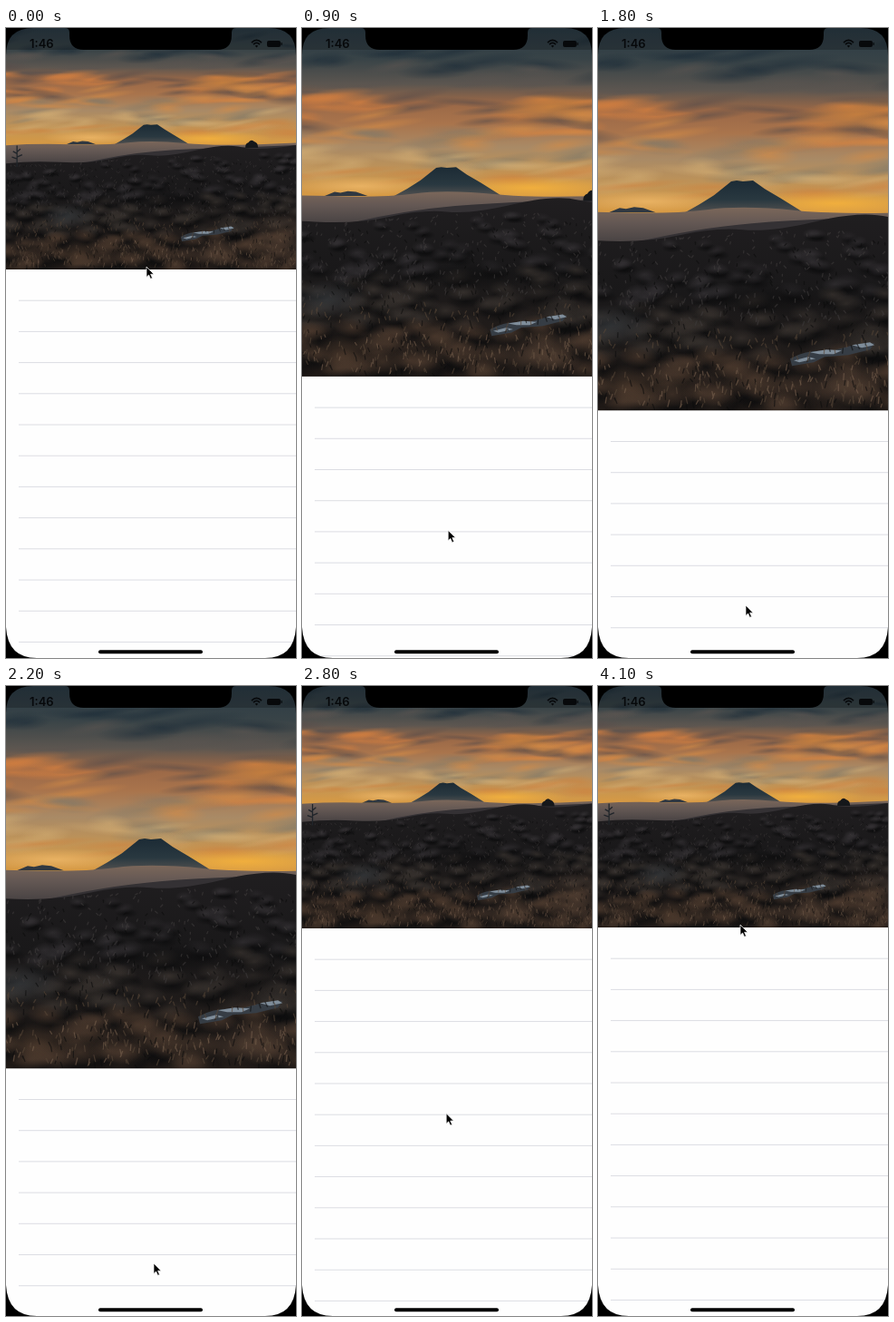
Recreate the animation shown at these times as an HTML page. Size 320 by 694 pixels, loop 4.2 s.

```html
<!DOCTYPE html>
<html lang="en">
<head>
<meta charset="utf-8">
<title>Stretchy header</title>
<style>
  html, body { margin: 0; width: 100%; height: 100%; overflow: hidden; background: #000; }
  svg { display: block; width: 320px; height: 694px; }
  text { font: 600 13px Inter, sans-serif; }
</style>
</head>
<body>
<svg viewBox="0 0 320 694">
  <defs>
    <linearGradient id="sky" x2="0" y2="1">
      <stop offset="0" stop-color="#2b3b45"/>
      <stop offset=".18" stop-color="#384347"/>
      <stop offset=".33" stop-color="#5c5650"/>
      <stop offset=".44" stop-color="#9a6847"/>
      <stop offset=".56" stop-color="#a9744c"/>
      <stop offset=".7" stop-color="#a98a66"/>
      <stop offset=".85" stop-color="#c29455"/>
      <stop offset="1" stop-color="#d99a41"/>
    </linearGradient>
    <linearGradient id="peak" x2="0" y2="1">
      <stop offset="0" stop-color="#1c2b35"/>
      <stop offset=".6" stop-color="#293840"/>
      <stop offset="1" stop-color="#51504f"/>
    </linearGradient>
    <linearGradient id="fog" x2="0" y2="1">
      <stop offset="0" stop-color="#7b675a"/>
      <stop offset=".35" stop-color="#645854"/>
      <stop offset="1" stop-color="#3d3a3c"/>
    </linearGradient>
    <linearGradient id="land" x2="0" y2="1">
      <stop offset="0" stop-color="#201e20"/>
      <stop offset=".4" stop-color="#191819"/>
      <stop offset=".75" stop-color="#211c1a"/>
      <stop offset="1" stop-color="#1e1815"/>
    </linearGradient>
  </defs>
  <g id="photo">
    <rect x="-100" width="520" height="206" fill="url(#sky)"/>
    <g id="clouds"></g>
    <path d="M12 203 L24 198 L31 199 L40 197 L50 198 L64 203Z" fill="#303841"/>
    <path d="M96 203 L112 194 L128 184 L147 169 L153 168 L160 169 L171 168 L184 177 L201 187 L222 200 L226 203Z" fill="url(#peak)"/>
    <path d="M-100 205 Q-40 201 20 203 T120 200 T220 201 T420 200 V245 H-100Z" fill="url(#fog)"/>
    <path d="M40 236 Q110 220 170 215 T300 209 L420 204 V250 H40Z" fill="#343134"/>
    <path d="M-100 237 Q-50 231 0 234 T90 228 T160 222 T240 213 T320 208 T420 203 V423 H-100Z" fill="url(#land)"/>
    <path d="M325 209 Q324 202 330 200 Q334 193 340 198 Q347 200 347 209Z" fill="#15171a"/>
    <path d="M-74 242 V205 M-74 219 l-7 -4 M-74 216 l6 -5 M-74 228 l-9 -3 M-74 225 l9 -4" stroke="#20252a" stroke-width="2" fill="none"/>
    <g id="bushes"></g>
    <path d="M212 364 Q232 353 256 356 L278 350 L305 347 L300 354 L276 360 L250 362 L238 368 L214 372Z" fill="#363d45"/>
    <path d="M234 357 l18 -3 l17 1 l-9 4 l-16 0Z M280 349 l20 -3 l5 3 l-14 3Z M216 366 l16 -4 l8 2 l-18 4Z" fill="#7f8d9a"/>
    <g id="grass" fill="none" stroke-linecap="round"></g>
  </g>
  <g id="table">
    <rect width="320" height="694" fill="#fefefe"/>
    <path id="rules" stroke="#dcdde3" fill="none"/>
  </g>
  <rect width="320" height="24" fill="#000" opacity=".22"/>
  <g fill="#07090b">
    <text x="26" y="22">1:46</text>
    <rect x="288" y="14" width="15" height="7" rx="2"/>
    <rect x="303.5" y="16" width="1.2" height="3" rx=".6"/>
    <path d="M274.6 17 l2 -2 M276.5 21.5 l-1.7 -1.8 a2.6 2.6 0 0 1 3.4 0Z"/>
    <path d="M273 18 Q276.5 14.5 280 18 M271 16 Q276.5 10.5 282 16" transform="translate(0 .2)" fill="none" stroke="#07090b" stroke-width="1.7"/>
  </g>
  <path d="M65 0 Q70 0 70 5 V8 Q70 24 86 24 H233 Q249 24 249 8 V5 Q249 0 254 0Z"/>
  <path fill-rule="evenodd" d="M0 0 H320 V694 H0Z M30 0 Q0 0 0 30 V660 Q2 694 34 694 H286 Q318 694 320 660 V30 Q320 0 290 0Z"/>
  <rect x="102" y="685.3" width="115" height="4" rx="2"/>
  <path id="cursor" d="M0 0 V11.4 L2.6 9 L4.5 13.3 L6.5 12.4 L4.6 8.2 H8.2Z" stroke="#fff" stroke-width=".7"/>
</svg>
<script>
const NS = 'http://www.w3.org/2000/svg';
const $ = id => document.getElementById(id);
const LOOP = 4200, STEP = 100;
const REST = 266, PULL = 155.3, FULL = 421, ROW = 34.2;

let seed = 17;
const rand = (a = 0, b = 1) => {
  seed = (seed * 16807) % 2147483647;
  return a + (b - a) * seed / 2147483647;
};

function add(parent, tag, attrs) {
  const el = document.createElementNS(NS, tag);
  for (const k in attrs) el.setAttribute(k, attrs[k]);
  parent.appendChild(el);
  return el;
}

// Soft-edged spots share one gradient per colour.
function soft(color) {
  const id = 'c' + color.slice(1);
  if (!$(id)) {
    const g = add(document.querySelector('defs'), 'radialGradient', { id });
    add(g, 'stop', { offset: 0, 'stop-color': color });
    add(g, 'stop', { offset: 1, 'stop-color': color, 'stop-opacity': 0 });
  }
  return `url(#${id})`;
}

function spot(parent, color, cx, cy, rx, ry, opacity, turn = 0) {
  add(parent, 'ellipse', {
    cx, cy, rx, ry, opacity, fill: soft(color),
    transform: `rotate(${turn} ${cx} ${cy})`
  });
}

// colour, top, bottom, count, opacity
const bands = [
  ['#1f2e39', 0, 55, 16, .6],
  ['#5a5450', 45, 80, 16, .6],
  ['#cf7d40', 80, 130, 26, .7],
  ['#584c49', 66, 128, 20, .6],
  ['#d58b45', 98, 148, 18, .6],
  ['#7b7769', 122, 166, 14, .5],
  ['#d3ae74', 146, 178, 16, .55],
  ['#cc8340', 164, 188, 12, .6]
];

function drawSky() {
  const sky = $('clouds');
  for (const [color, top, end, n, alpha] of bands)
    for (let i = 0; i < n; i++)
      spot(sky, color, rand(-100, 420), rand(top, end), rand(25, 75), rand(4, 11), alpha, rand(-12, 6));
  spot(sky, '#e79035', 285, 95, 75, 18, .5, -5);
  spot(sky, '#f4b13c', 262, 193, 110, 14, .9);
  spot(sky, '#efb868', 55, 191, 85, 12, .8);
}

const shore = x => 236 - 34 * Math.max(0, x + 20) / 440;

function drawLand() {
  const bushes = $('bushes');
  for (let i = 0; i < 230; i++) {
    const d = i / 230, x = rand(-100, 420);
    const y = shore(x) + 9 + d * (410 - shore(x));
    const r = 9 + 20 * d * rand(.6, 1.1);
    const light = d < .35 ? '#353235' : d < .68 ? '#39332f' : '#4b392d';
    spot(bushes, '#0c0c0d', x + 3, y + r * .55, r * 1.3, r * .55, .85);
    spot(bushes, light, x, y, r * 1.1, r * .6, rand(.35, .85), rand(-15, 15));
  }
  spot(bushes, '#454a4e', 15, 328, 50, 24, .55);
  spot(bushes, '#5b4638', 270, 395, 55, 32, .5);
  spot(bushes, '#5b4638', 390, 365, 70, 55, .45);
  spot(bushes, '#4f3b2c', 35, 392, 45, 22, .5);
  spot(bushes, '#0a0a0b', 195, 300, 70, 18, .5);

  const tufts = { '#3f3b3b': [225, 330, 380], '#0c0c0c': [235, 421, 380], '#574638': [335, 418, 330], '#77604e': [370, 418, 110] };
  for (const color in tufts) {
    const [top, end, n] = tufts[color];
    let d = '';
    for (let i = 0; i < n; i++) {
      const x = rand(-100, 420), y = Math.max(rand(top, end), shore(x) + 5);
      const len = 1.5 + (y - 200) / 45;
      d += `M${x.toFixed(1)} ${y.toFixed(1)}l${rand(-2.5, 2.5).toFixed(1)} ${(-len * rand(.5, 1.2)).toFixed(1)}`;
    }
    add($('grass'), 'path', { d, stroke: color, 'stroke-width': 1.3, opacity: .6 });
  }
}

const ease = (t, a, b) => {
  const p = Math.min(1, Math.max(0, (t - a) / (b - a)));
  return p * p * (3 - 2 * p);
};

// Rubber-band pull, then a critically damped return.
function headerHeight(t) {
  if (t < 2203) return REST + PULL * Math.pow(ease(t, 100, 1250), 1.1);
  const x = (t - 2203) * .012;
  return REST + PULL * (1 + x) * Math.exp(-x);
}

function cursorAt(t) {
  const down = ease(t, 100, 1250), up = ease(t, 2450, 3200), settle = ease(t, 3150, 3800);
  return [155 + 8 * down - 8.5 * up + 2.5 * settle, 263 + 373 * down - 367 * up - 6 * settle];
}

function draw(time) {
  const t = Math.floor((time % LOOP) / STEP) * STEP;
  const h = headerHeight(t), s = h / FULL;
  $('photo').setAttribute('transform', `translate(${160 * (1 - s)}) scale(${s})`);
  $('table').setAttribute('transform', `translate(0 ${h})`);
  $('cursor').setAttribute('transform', `translate(${cursorAt(t)})`);
}

drawSky();
drawLand();
$('rules').setAttribute('d', Array.from({ length: 12 }, (_, i) => `M14 ${(i + 1) * ROW}H320`).join(''));

const start = performance.now();
function loop() {
  draw(performance.now() - start);
  requestAnimationFrame(loop);
}
loop();
</script>
</body>
</html>
```
